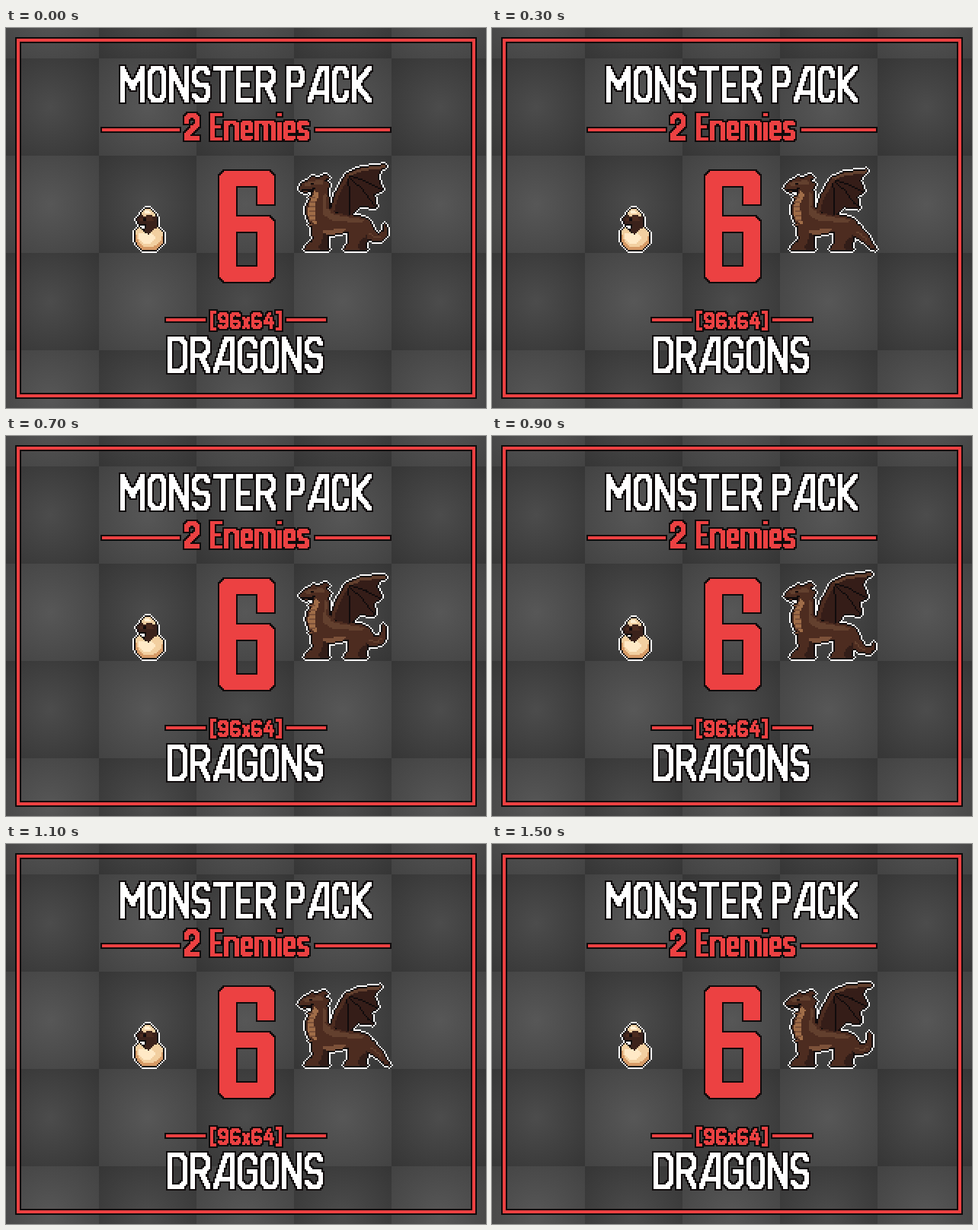
Recreate the animation shown at these times as an HTML page with a canvas. Size 630 by 500 pixels, loop 1600 ms.

```html
<!DOCTYPE html>
<html lang="en">
<head>
<meta charset="utf-8">
<title>Monster Pack</title>
<style>
html, body { margin: 0; width: 100%; height: 100%; overflow: hidden; background: #404040; }
canvas { display: block; width: 630px; height: 500px; }
</style>
</head>
<body>
<canvas id="stage" width="630" height="500">MONSTER PACK - 2 Enemies - 6 - [96x64] - DRAGONS</canvas>
<script>
const RED = '#ec4142', INK = '#100b0c', WHITE = '#ffffff';
const HIDE = '#4d2c20', DARK = '#321d18', LIGHT = '#63402e', TAN = '#a06d48', SKIN = '#351d18';
const stage = document.getElementById('stage').getContext('2d');
stage.imageSmoothingEnabled = false;

function layer(w, h) {
  const c = document.createElement('canvas');
  c.width = w;
  c.height = h;
  const g = c.getContext('2d');
  g.imageSmoothingEnabled = false;
  return g;
}

const lerp = (a, b, t) => a + (b - a) * t;
const mix = (p, q, t) => [lerp(p[0], q[0], t), lerp(p[1], q[1], t)];
const points = s => s.split(' ').map(p => p.split(',').map(Number));

// Hard-edged scanline fill
function poly(g, pts, color) {
  g.fillStyle = color;
  const ys = pts.map(p => p[1]);
  for (let y = Math.floor(Math.min(...ys)); y < Math.max(...ys); y++) {
    const cy = y + .5, xs = [];
    pts.forEach(([x1, y1], i) => {
      const [x2, y2] = pts[(i + 1) % pts.length];
      if ((y1 <= cy) !== (y2 <= cy)) xs.push(lerp(x1, x2, (cy - y1) / (y2 - y1)));
    });
    xs.sort((a, b) => a - b);
    for (let i = 0; i + 1 < xs.length; i += 2) {
      const a = Math.round(xs[i]), b = Math.ceil(xs[i + 1] - .5);
      if (b > a) g.fillRect(a, y, b - a, 1);
    }
  }
}

// Polyline drawn with a rectangular brush anchored at its top left
function line(g, pts, bw, bh, color) {
  g.fillStyle = color;
  for (let i = 1; i < pts.length; i++) {
    const [p, q] = [pts[i - 1], pts[i]];
    const n = Math.ceil(Math.max(Math.abs(q[0] - p[0]), Math.abs(q[1] - p[1]), 1));
    for (let k = 0; k <= n; k++) {
      const [x, y] = mix(p, q, k / n);
      g.fillRect(Math.round(x), Math.round(y), bw, bh);
    }
  }
}

function taper(g, pts, w0, w1, color) {
  const n = pts.length - 1;
  g.fillStyle = color;
  for (let k = 0; k <= n * 8; k++) {
    const t = k / 8, i = Math.min(Math.floor(t), n - 1);
    const w = Math.max(1, Math.round(lerp(w0, w1, t / n)));
    const [x, y] = mix(pts[i], pts[i + 1], t - i);
    g.fillRect(Math.round(x - (w - 1) / 2), Math.round(y - (w - 1) / 2), w, w);
  }
}

function outline(g, color, corners = false) {
  const { width, height } = g.canvas, t = layer(width, height);
  t.drawImage(g.canvas, 0, 0);
  t.globalCompositeOperation = 'source-in';
  t.fillStyle = color;
  t.fillRect(0, 0, width, height);
  g.globalCompositeOperation = 'destination-over';
  for (let x = -1; x <= 1; x++) for (let y = -1; y <= 1; y++)
    if (corners || !x || !y) g.drawImage(t.canvas, x, y);
  g.globalCompositeOperation = 'source-over';
}

// Letter strokes on a 0-8 by 0-8 grid, each point written as xy
const GLYPHS = {
  M: '08 00 45 80 88', O: '01 20 60 81 87 68 28 07 01', N: '08 00 88 80',
  S: '81 60 20 01 03 24 64 85 87 68 28 07', T: '00 80/40 48',
  E: '80 00 08 88/04 64', R: '08 00 60 81 83 64 04/44 88', P: '08 00 60 81 83 64 04',
  A: '08 50 80 88/26 86', C: '82 81 60 20 01 07 28 68 87 86', K: '00 08/80 14 88',
  D: '00 60 81 87 68 08 00', G: '82 81 60 20 01 07 28 68 87 84 54',
  n: '00 08/01 20 60 81 88', e: '04 84 81 60 20 01 07 28 68 87',
  m: '00 08/00 30 41 48/40 70 81 88', i: '00 00/03 08', x: '00 88/80 08',
  2: '02 01 20 60 81 83 07 08 88', 6: '81 60 20 01 07 28 68 87 85 64 04',
  9: '07 28 68 87 81 60 20 01 03 24 84', 4: '40 05 85/63 68',
  '[': '80 00 08 88', ']': '00 80 88 08'
};
GLYPHS.s = GLYPHS.S;

// Widths relative to the usual letter
const WIDTHS = { M: 1.25, m: 1.55, i: .35, x: .7, n: 1.1, A: 1.08, ' ': .25 };
const widthOf = ch => WIDTHS[ch] ||
  ('[]'.includes(ch) ? .57 : 'CE'.includes(ch) ? .85 : 'OSPes'.includes(ch) ? .92 : 1);

function text(g, str, x, y, em, h, bw, bh, gap, color) {
  for (const ch of str) {
    const w = Math.round(em * widthOf(ch)), bracket = '[]'.includes(ch);
    const tall = 'nemsx'.includes(ch) ? Math.round(h * .73) : bracket ? h + 2 : h;
    const top = y + h - tall + (bracket ? 1 : 0);
    for (const stroke of (GLYPHS[ch] || '').split('/').filter(Boolean))
      line(g, stroke.split(' ').map(p => [
        x + (w - bw) * p[0] / 8, top + (tall - bh) * p[1] / 8
      ]), bw, bh, color);
    x += w + gap;
  }
}

function background() {
  const g = layer(630, 500);
  for (let r = 0; r < 5; r++) for (let c = 0; c < 5; c++) {
    const x = c * 128 - 6, y = r * 128 - 88;
    const glow = g.createRadialGradient(x + 64, y + 64, 0, x + 64, y + 64, 88);
    const [mid, rim] = (r + c) % 2 ? ['#4c4c4c', '#363636'] : ['#575757', '#434343'];
    glow.addColorStop(0, mid);
    glow.addColorStop(1, rim);
    g.fillStyle = glow;
    g.fillRect(x, y, 128, 128);
  }
  return g;
}

function lettering() {
  const g = layer(315, 250);
  const box = (x, y, w, h) => g.fillRect(x, y, w, h);
  g.fillStyle = RED;
  box(7, 7, 301, 236);
  g.clearRect(9, 9, 297, 232);
  box(63, 66, 51, 2);
  box(203, 66, 49, 2);
  box(105, 191, 26, 2);
  box(184, 191, 26, 2);
  text(g, 'MONSTER PACK', 75, 25, 13, 24, 3, 3, 2, WHITE);
  text(g, 'DRAGONS', 106, 203, 13, 24, 3, 3, 2, WHITE);
  text(g, '2', 117, 56, 10, 18, 3, 3, 1, RED);
  text(g, 'Enemies', 134, 56, 9, 18, 3, 2, 1, RED);
  text(g, '[96x64]', 134, 187, 7, 11, 2, 2, 1, RED);

  const slab = (x, y, w, h, cut) => poly(g, [
    [x + cut, y], [x + w - cut, y], [x + w, y + cut], [x + w, y + h - cut],
    [x + w - cut, y + h], [x + cut, y + h], [x, y + h - cut], [x, y + cut]
  ], RED);
  slab(140, 94, 36, 73, 3);
  g.clearRect(151, 104, 14, 20);
  g.clearRect(165, 116, 11, 11);
  slab(151, 124, 25, 30, 3);
  g.fillRect(151, 124, 4, 10);
  g.clearRect(151, 134, 14, 23);
  outline(g, INK, true);
  return g;
}

const STEP = 100, POSES = 8, CYCLE = STEP * POSES;
const wave = (pose, peak, period = POSES) => Math.cos(2 * Math.PI * (pose - peak) / period);

// The bend travels from root to tip and grows on the way
function tailPath(pose) {
  const path = [[44, 41]], n = 8, seg = 24 / n;
  for (let i = 0; i < n; i++) {
    const s = (i + .5) / n, [x, y] = path[i];
    const a = (58 - 93 * s + 85 * s * wave(pose, 4 * s)) * Math.PI / 180;
    path.push([x + seg * Math.cos(a), y + seg * Math.sin(a)]);
  }
  return path;
}

function wing(g, pose) {
  const lift = .925 + .075 * wave(pose, .5), reach = -.5 + 1.5 * wave(pose, 0);
  const flap = ([x, y]) => [x + reach * (x - 22) / 35, 35 - (35 - y) * lift];
  const arm = points('23,32 26,21 33,8').map(flap);
  const tips = points('57,2 56,18 52,30 35,36').map(flap);
  const wrist = arm[2], ridge = flap([42, 4]);
  const edge = tips.flatMap((tip, i) =>
    i ? [mix(mix(tips[i - 1], tip, .5), wrist, .17), tip] : [tip]);
  poly(g, [...arm, ridge, ...edge], SKIN);
  line(g, [wrist, ridge, tips[0]], 1, 2, LIGHT);
  for (const tip of tips.slice(1)) {
    const knuckle = mix(mix(wrist, tip, .5), ridge, .12);
    line(g, [wrist, knuckle, mix(wrist, tip, .94)], 1, 1, INK);
  }
  line(g, arm, 2, 2, HIDE);
}

function leg(g, hip, knee, foot, w, color) {
  taper(g, [hip, knee, [foot, 55]], w, 3, color);
  poly(g, [[foot - 2, 53], [foot + 3, 55], [foot + 4, 58], [foot - 6, 58], [foot - 5, 55]], color);
}

function dragon(g, pose) {
  const sway = -.4 - .6 * wave(pose, 2);
  const lean = s => points(s).map(([x, y]) =>
    [x + sway * Math.max(0, Math.min(1, (40 - y) / 14)), y]);
  const shape = (s, color) => poly(g, lean(s), color);

  const tail = tailPath(pose);
  taper(g, tail, 7, 1, HIDE);
  line(g, tail.slice(0, 6), 1, 1, LIGHT);
  leg(g, [18, 45], [18, 50], 18, 5, DARK);
  leg(g, [42, 45], [44, 50], 43, 6, DARK);
  shape('13,17 11,23 8,28 7,33 9,39 13,44 18,47 34,46 48,48 50,42 46,37 36,35 27,34 22,30 22,24 21,16', HIDE);
  shape('19,20 21,22 20,30 26,35 45,38 44,40 25,39 18,35', LIGHT);
  shape('13,19 16,21 13,28 13,34 14,42 9,38 8,32 10,26', TAN);
  for (let y = 23; y < 42; y += 3) line(g, lean(`9,${y} 12,${y}`), 1, 1, '#7c5139');
  shape('15,45 34,44 31,47 21,48', '#7c5139');
  leg(g, [14, 44], [14, 49], 12, 7, HIDE);
  leg(g, [40, 44], [38, 49], 38, 10, HIDE);

  wing(g, pose);
  shape('3,17 5,14 9,12 11,10 15,11 19,9 23,10 19,12 23,15 21,19 15,20 11,18 7,20 4,19', HIDE);
  shape('5,15 9,13 18,12 19,15 12,15 8,16', LIGHT);
  line(g, lean('4,18 8,18 12,17'), 1, 1, INK);
  line(g, lean('10,14 11,14'), 1, 1, INK);
}

function hatchling(g, pose) {
  const dip = Math.round(.45 - .5 * wave(pose, 3, 4));
  const shape = (s, color, dy = 0) => poly(g, points(s).map(([x, y]) => [x, y + dy]), color);
  shape('3,8 6,5 14,5 16,8 16,18 8,17 9,12 4,12', '#3b221b', dip);
  shape('5,8 13,7 14,10 5,10', HIDE, dip);
  shape('5,5 7,3 9,2 12,2 15,5 15,7 11,6 8,7', '#f1cfa2', dip);
  shape('8,3 11,3 12,5 8,5', '#fff0d3', dip);
  g.fillStyle = INK;
  g.fillRect(7, 8 + dip, 2, 2);

  const rim = '2,17 4,14 7,16 9,18 13,16 17,14 20,18 ';
  shape(rim + '20,24 17,28 15,29 7,29 4,27 2,23', '#d69a66');
  shape(rim + '19,22 16,26 12,27 7,27 4,24', '#f2cfa0');
  shape('4,18 8,18 13,18 16,21 12,25 7,25 4,22', '#ffe9c6');
  shape('8,15 14,15 13,17 10,19', '#3b221b');
}

function sprite(draw, w, h, pose) {
  const g = layer(w, h);
  draw(g, pose);
  outline(g, INK);
  outline(g, WHITE);
  return g.canvas;
}

const scene = background();
scene.drawImage(lettering().canvas, 0, 0, 630, 500);
const sprites = Array.from({ length: POSES }, (_, pose) => ({
  egg: sprite(hatchling, 24, 32, pose),
  beast: sprite(dragon, 70, 62, pose)
}));

let shown = -1;
function tick(now) {
  const pose = Math.floor(now % CYCLE / STEP);
  if (pose !== shown) {
    shown = pose;
    const { egg, beast } = sprites[pose];
    stage.drawImage(scene.canvas, 0, 0);
    stage.drawImage(egg, 166, 234, 48, 64);
    stage.drawImage(beast, 380, 176, 140, 124);
  }
  requestAnimationFrame(tick);
}
tick(0);
</script>
</body>
</html>
```
